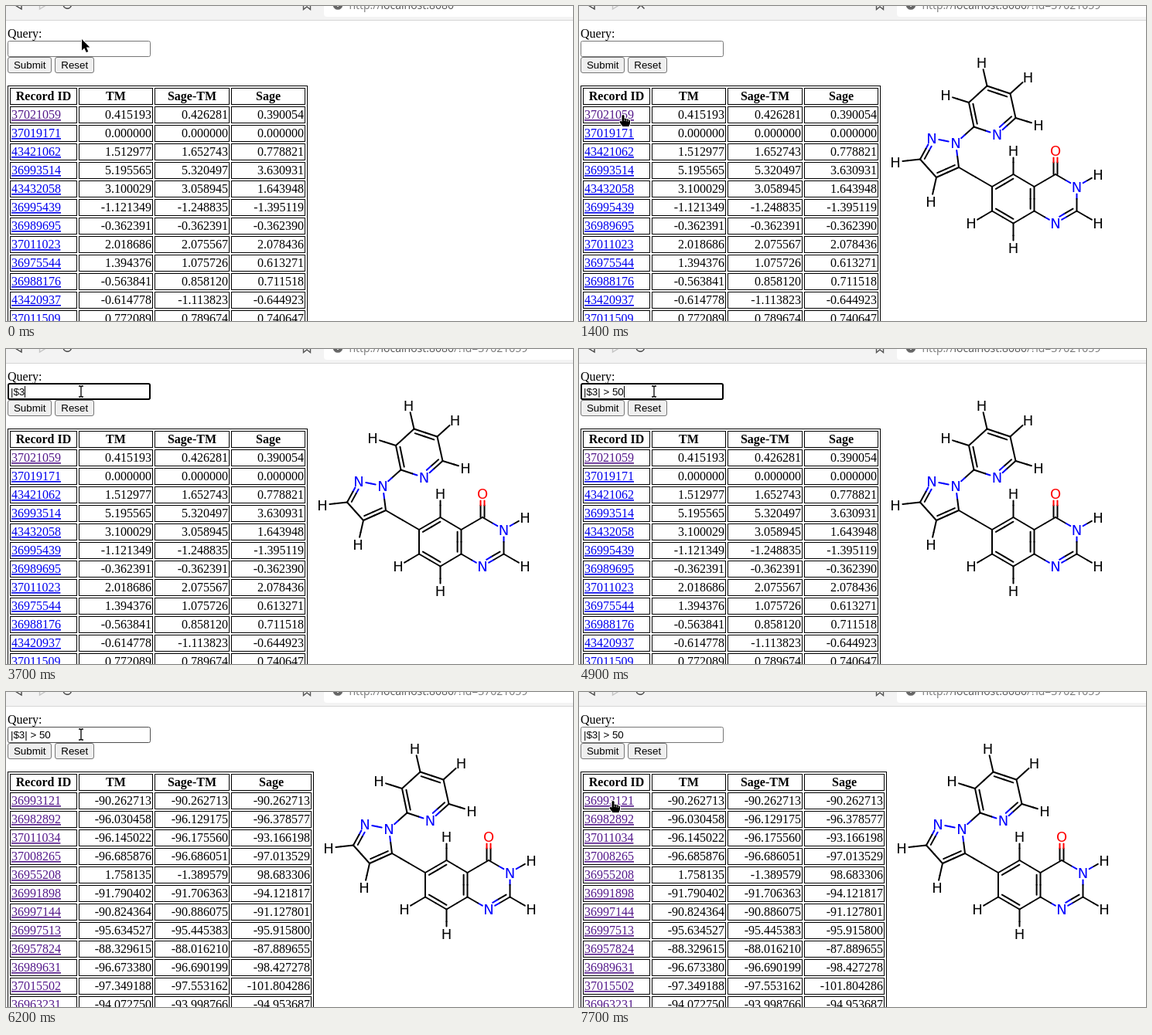
Recreate the animation shown at these times as an HTML page. Size 733 by 408 pixels, loop 8000 ms.

```html
<!DOCTYPE html>
<html lang="en">
<head>
<meta charset="utf-8">
<title>Record query</title>
<style>
  html, body { margin: 0; width: 100%; height: 100%; overflow: hidden; background: #fff; }
  svg { display: block; width: 733px; height: 408px; }
  .serif { font: 16px "Liberation Serif", "Times New Roman", serif; }
  .th { font-weight: bold; text-anchor: middle; }
  .num { text-anchor: end; }
  .link { text-decoration: underline; fill: #0000ee; }
  .seen { fill: #551a8b; }
  .ui { font: 13.3333px "Liberation Sans", Arial, sans-serif; white-space: pre; }
  .mid { text-anchor: middle; }
  .url { font: 14px "Open Sans", "Noto Sans", sans-serif; fill: #777; }
  .atom { font: 18px "DejaVu Sans", sans-serif; text-anchor: middle; }
  .box { fill: none; stroke: #000; }
  .icon { fill: none; stroke: #444; stroke-width: 1.4; }
  .ring { fill: none; stroke: #000; stroke-width: 2; }
</style>
</head>
<body>
<svg id="stage" viewBox="0 0 733 408" xmlns="http://www.w3.org/2000/svg">
  <rect width="733" height="408" fill="#fff"/>

  <g id="toolbar">
    <rect width="733" height="18" fill="#f3f3f3"/>
    <rect y="18" width="733" height="1" fill="#d6d6d6"/>
    <path d="M411 0V10Q411 14 415 14H733V0Z" fill="#fff"/>
    <path class="icon" d="M20 -5V4L12.5 -0.5"/>
    <path class="icon" d="M43.500 -5V4L51 -0.500" style="stroke:#c4c4c4"/>
    <path id="reload" class="icon" d="M74 -2A5.300 5.300 0 0 0 84.500 -1"/>
    <path id="stop" class="icon" d="M75.500 3.500L80 -1L84.500 3.500"/>
    <path class="icon" d="M384.500 -4V4.500L389 1L393.500 4.500V-4" style="stroke:#555"/>
    <circle cx="429" cy="-1.500" r="6.300" fill="#666"/>
    <rect x="428.200" y="-3" width="1.600" height="4" fill="#fff"/>
    <text class="url" x="443.500" y="3.500">http://<tspan fill="#555">localhost:8080</tspan><tspan id="path"></tspan></text>
  </g>

  <text class="serif" x="2" y="41">Query:</text>
  <rect id="field" x="2.500" y="45.500" width="184" height="20" rx="2" fill="#fff"/>
  <rect id="fieldRing" class="ring" x="3" y="45" width="183" height="20" rx="2"/>
  <text id="query" class="ui" x="6" y="60"></text>
  <rect id="caret" y="48" width="1" height="15"/>

  <g fill="#efefef" stroke="#767676">
    <rect x="2.500" y="66.500" width="56" height="20" rx="2.500"/>
    <rect x="63.500" y="66.500" width="50" height="20" rx="2.500"/>
  </g>
  <rect id="submitRing" class="ring" x="3" y="67" width="55" height="19" rx="2"/>
  <text class="ui mid" x="30.700" y="81">Submit</text>
  <text class="ui mid" x="88.700" y="81">Reset</text>

  <g id="before"></g>
  <g id="after"></g>
  <g id="molecule"></g>

  <g id="arrow">
    <path d="M0 0V14.500L3.300 11.500L5.800 17L8.300 15.900L5.900 10.500H10.300Z" stroke="#fff" stroke-width="2" stroke-linejoin="round" paint-order="stroke"/>
  </g>
  <g id="beam" fill="none">
    <path d="M-3 -7H-1L0 -6L1 -7H3M0 -6V6M-3 7H-1L0 6L1 7H3" stroke="#fff" stroke-width="3"/>
    <path d="M-3 -7H-1L0 -6L1 -7H3M0 -6V6M-3 7H-1L0 6L1 7H3" stroke="#000" stroke-width="1.300"/>
  </g>
  <g id="hand">
    <path d="M-1.500 1Q0 -1 1.500 1V5Q3 4 4.200 5.400Q6 4.700 6.800 6.200Q9 5.800 9 8V11L7.500 15H-0.500L-4.500 9.500Q-4.500 7.500 -2.500 8L-1.500 9Z" stroke="#fff" stroke-width="2" stroke-linejoin="round" paint-order="stroke"/>
    <path d="M1.700 5.500V8M4.300 6V8.500M6.800 6.800V9" fill="none" stroke="#fff" stroke-width=".7"/>
  </g>
</svg>

<script>
const LOOP = 8000;
const el = id => document.getElementById(id);

function add(parent, tag, attrs, text) {
  const node = document.createElementNS("http://www.w3.org/2000/svg", tag);
  for (const key in attrs) node.setAttribute(key, attrs[key]);
  if (text !== undefined) node.textContent = text;
  parent.appendChild(node);
}

// Results table
const before = `37021059 0.415193 0.426281 0.390054
37019171 0.000000 0.000000 0.000000
43421062 1.512977 1.652743 0.778821
36993514 5.195565 5.320497 3.630931
43432058 3.100029 3.058945 1.643948
36995439 -1.121349 -1.248835 -1.395119
36989695 -0.362391 -0.362391 -0.362390
37011023 2.018686 2.075567 2.078436
36975544 1.394376 1.075726 0.613271
36988176 -0.563841 0.858120 0.711518
43420937 -0.614778 -1.113823 -0.644923
37011509 0.772089 0.789674 0.740647`;

const after = `36993121 -90.262713 -90.262713 -90.262713
36982892 -96.030458 -96.129175 -96.378577
37011034 -96.145022 -96.175560 -93.166198
37008265 -96.685876 -96.686051 -97.013529
36955208 1.758135 -1.389579 98.683306
36991898 -91.790402 -91.706363 -94.121817
36997144 -90.824364 -90.886075 -91.127801
36997513 -95.634527 -95.445383 -95.915800
36957824 -88.329615 -88.016210 -87.889655
36989631 -96.673380 -96.690199 -98.427278
37015502 -97.349188 -97.553162 -101.804286
36963231 -94.072750 -93.998766 -94.953687`;

function drawTable(group, data, lastWidth, isSeen) {
  const cols = [[5, 87], [94, 96], [192, 97], [291, lastWidth]];
  const rows = [["Record ID", "TM", "Sage-TM", "Sage"], ...data.split("\n").map(r => r.split(" "))];
  add(group, "rect", { class: "box", x: 2.5, y: 103.5, width: 291 + lastWidth, height: 330 });
  rows.forEach((row, r) => row.forEach((text, c) => {
    const [x, w] = cols[c], y = 106 + 24 * r;
    add(group, "rect", { class: "box", x: x + .5, y: y + .5, width: w - 1, height: 21 });
    const kind = r === 0 ? "th" : c ? "num" : isSeen(r) ? "link seen" : "link";
    const tx = r === 0 ? x + w / 2 : c ? x + w - 2 : x + 2;
    add(group, "text", { class: "serif " + kind, x: tx, y: y + 16 }, text);
  }));
}

// Molecule: element, position and, for hydrogens, the atom they hang on
const atoms = `C 527.5 103.5|C 557.5 113.5|C 564.5 145|N 540.5 166.5|C 510.5 156.5|C 504 125
N 487 177.5|N 456 171|C 441 198.5|C 462 222|C 491 209
C 534 234|C 561.5 218|C 588.5 234|C 588.5 265.5|C 561.5 281.5|C 534 265.5
C 616 218|N 643.5 234|C 643.5 265.5|N 616 281.5|O 616 187
H 520.5 73 0|H 580.5 92.5 1|H 594 154 2|H 474 115.5 5|H 409 202 8|H 455 253 9
H 561.5 187 12|H 561.5 313 15|H 507 281.5 16|H 671 218 18|H 671 281.5 19`
  .split(/[|\n]/).map(s => {
    const [type, x, y, on] = s.split(" ");
    return { type, x: +x, y: +y, on };
  });
const chains = [[0, 1, 2, 3, 4, 5, 0], [6, 7, 8, 9, 10, 6], [11, 12, 13, 14, 15, 16, 11], [13, 17, 18, 19, 20, 14]];
const doubles = new Set("0-1 2-3 4-5 7-8 9-10 11-12 13-14 15-16 19-20".split(" "));
const colors = { C: "#000", H: "#000", N: "#0000ff", O: "#ff0000" };

function drawBond(group, a, b, gap = 9.5) {
  const len = Math.hypot(b.x - a.x, b.y - a.y);
  const at = k => [a.x + (b.x - a.x) * k, a.y + (b.y - a.y) * k];
  const trim = atom => atom.type === "C" ? 0 : gap / len;
  const line = (from, to, stroke) => add(group, "path",
    { d: `M${at(from)}L${at(to)}`, stroke, "stroke-width": 2, "stroke-linecap": "round" });
  line(trim(a), .5, colors[a.type]);
  line(.5, 1 - trim(b), colors[b.type]);
}

function drawMolecule(group) {
  for (const chain of chains) {
    const ring = [...new Set(chain)];
    const mean = key => ring.reduce((sum, i) => sum + atoms[i][key], 0) / ring.length;
    const cx = mean("x"), cy = mean("y"), scale = ring.length === 5 ? .78 : .82;
    const inner = p => ({ type: p.type, x: cx + (p.x - cx) * scale, y: cy + (p.y - cy) * scale });
    for (let k = 1; k < chain.length; k++) {
      const a = atoms[chain[k - 1]], b = atoms[chain[k]];
      drawBond(group, a, b);
      if (doubles.has(chain[k - 1] + "-" + chain[k])) drawBond(group, inner(a), inner(b), 6);
    }
  }
  drawBond(group, atoms[4], atoms[6]);
  drawBond(group, atoms[10], atoms[11]);
  for (const dx of [-2.5, 2.5]) {
    const shift = p => ({ ...p, x: p.x + dx });
    drawBond(group, shift(atoms[17]), shift(atoms[21]));
  }
  for (const atom of atoms) {
    if (atom.on) drawBond(group, atoms[atom.on], atom);
    if (atom.type !== "C")
      add(group, "text", { class: "atom", x: atom.x, y: atom.y + 6.6, fill: colors[atom.type] }, atom.type);
  }
}

// Pointer stops: start time, shape, x, y
const stops = [
  [0, "arrow", 98, 43], [600, "beam", 98, 49],
  [800, "beam", 95, 58], [900, "arrow", 84, 88], [1000, "arrow", 68, 122], [1100, "hand", 57, 141],
  [1700, "arrow", 72, 108], [1800, "arrow", 90, 70], [1900, "beam", 97, 55],
  [7100, "beam", 94, 58], [7200, "arrow", 86, 80], [7300, "arrow", 72, 112], [7400, "hand", 57, 145],
  [7500, "hand", 48, 155], [7600, "hand", 45, 148], [7700, "hand", 44, 141]
];

// Typing: start time of each character and the caret place after it
const typed = "|$3| > 50";
const keyTimes = [3200, 3400, 3700, 4200, 4400, 4600, 4700, 4800, 4900];
const advance = { "|": .26, " ": .278, ">": .584 };
const caretX = n => Math.round(6 + 13.3333 * [...typed.slice(0, n)].reduce((w, c) => w + (advance[c] || .556), 0));

const show = (id, on) => el(id).setAttribute("visibility", on ? "visible" : "hidden");

function render(t) {
  const within = (from, to) => t >= from && t < to;
  const filtered = t >= 6200;

  show("stop", within(1300, 1500));
  show("reload", !within(1300, 1500));
  el("path").textContent = t >= 1300 ? "/?id=37021059" : "";

  show("before", !filtered);
  show("after", filtered);
  show("molecule", t >= 1400);
  el("molecule").setAttribute("transform", `translate(${filtered ? 8 : 0} 0)`);

  const count = keyTimes.filter(k => k <= t).length;
  el("query").textContent = typed.slice(0, count);
  show("fieldRing", within(2100, 5100));
  show("submitRing", within(5100, 6200));
  show("caret", within(2100, 2700) || within(3200, 5100));
  el("caret").setAttribute("x", caretX(count));

  const [, shape, x, y] = stops.filter(s => s[0] <= t).pop();
  for (const id of ["arrow", "beam", "hand"]) show(id, id === shape);
  el(shape).setAttribute("transform", `translate(${x} ${y})`);
  el("field").setAttribute("stroke", shape === "beam" ? "#4f4f4f" : "#767676");
}

drawTable(el("before"), before, 96, r => r === 1);
drawTable(el("after"), after, 104, () => true);
drawMolecule(el("molecule"));

const start = performance.now();
function tick() {
  render((performance.now() - start) % LOOP);
  requestAnimationFrame(tick);
}
render(0);
requestAnimationFrame(tick);
</script>
</body>
</html>
```
